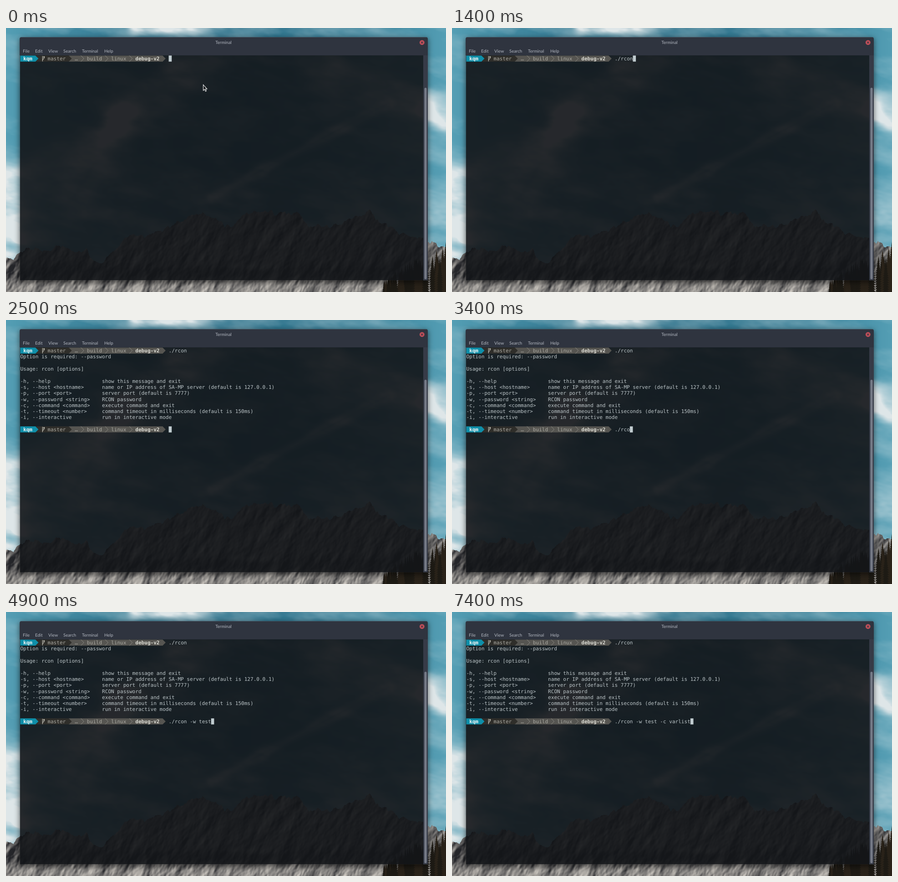
An HTML page with a canvas for the animation above (8 s loop, 967x579 px).

```html
<!DOCTYPE html>
<html lang="en">
<head>
<meta charset="utf-8">
<title>Terminal</title>
<style>
  html, body { margin: 0; width: 100%; height: 100%; overflow: hidden; background: #3f8ba2; }
  canvas, svg { position: absolute; left: 0; top: 0; width: 967px; height: 579px; }
  .shadow {
    position: absolute; left: 30px; top: 20px; width: 897px; height: 534px;
    border-radius: 4px 4px 0 0; box-shadow: 0 3px 12px 1px rgba(0, 0, 0, .5);
  }
  text { white-space: pre; text-rendering: geometricPrecision; }
  .ui { font: 9.5px Lato, "Open Sans", sans-serif; fill: #b4b9c2; }
  .mono { font: 11.06px "DejaVu Sans Mono", monospace; fill: #bcc5c8; }
  .bold { font-weight: bold; }
</style>
</head>
<body>
<canvas id="scene" width="967" height="579"></canvas>
<div class="shadow"></div>
<svg id="stage" viewBox="0 0 967 579">
  <rect x="30.5" y="60" width="887" height="493.5" fill="#121418" fill-opacity=".9"/>
  <path d="M30 60V24a4 4 0 0 1 4-4H923a4 4 0 0 1 4 4V60Z" fill="#2f343f"/>
  <path d="M33 20.5H924" stroke="#3d434f"/>
  <rect x="917" y="60" width="10" height="493.5" fill="#363b47"/>
  <rect x="919.5" y="131" width="5" height="420" rx="2.5" fill="#767b87"/>
  <circle cx="914.3" cy="31.8" r="5.4" fill="#c04f5a"/>
  <path d="M912.3 29.8l4 4m0-4l-4 4" stroke="#2f343f" stroke-width="1.2"/>
  <text class="ui" x="478" y="35.2" text-anchor="middle">Terminal</text>
  <g id="menu"></g>
  <g id="screen"></g>
  <path id="arrow" d="M433.5 124.5v12.6l2.9-2.6 2 4.4 1.9-.9-1.9-4.2h3.4Z"
        fill="#15191c" stroke="#f2f2f2" stroke-width="1.1"/>
  <g id="beam" fill="none">
    <path d="M430 116q3 0 3 2v12q0 2-3 2M436 116q-3 0-3 2v12q0 2 3 2" stroke="#f2f2f2" stroke-width="2.4"/>
    <path d="M430 116q3 0 3 2v12q0 2-3 2M436 116q-3 0-3 2v12q0 2 3 2" stroke="#15191c" stroke-width=".9"/>
  </g>
</svg>
<script>
const W = 967, H = 579, LOOP = 8000;
const byId = id => document.getElementById(id);

// ---------- wallpaper ----------
const ctx = byId('scene').getContext('2d');
const clamp = v => Math.max(0, Math.min(1, v));
const lerp = (a, b, k) => a + (b - a) * k;
const mix = (a, b, k) => a.map((v, i) => lerp(v, b[i], k));
const ease = k => k * k * (3 - 2 * k);
const bell = d => Math.exp(-d * d);

function hash(x, y) {
  let h = Math.imul(x, 374761393) + Math.imul(y, 668265263);
  h = Math.imul(h ^ h >>> 13, 1274126177);
  return ((h ^ h >>> 16) >>> 0) / 4294967296;
}

function noise(x, y) {
  const ix = Math.floor(x), iy = Math.floor(y), kx = ease(x - ix), ky = ease(y - iy);
  return lerp(
    lerp(hash(ix, iy), hash(ix + 1, iy), kx),
    lerp(hash(ix, iy + 1), hash(ix + 1, iy + 1), kx), ky);
}

function fractal(x, y, octaves) {
  let sum = 0, total = 0;
  for (let o = 0, size = 1; o < octaves; o++, size /= 2) {
    sum += size * noise(x / size, y / size);
    total += size;
  }
  return sum / total;
}

// cloud bands: from, to, width, strength
const bands = [
  [430, 50, 260, 180, 42, .55],
  [260, 180, 150, 370, 34, .5],
  [230, 215, 0, 340, 30, .5],
  [840, 165, 450, 370, 10, .4],
  [650, 70, 960, 190, 34, .5],
  [-5, 330, 10, 470, 42, .8],
  [290, -4, 470, -4, 16, .7],
  [925, 185, 980, 225, 17, .8]
];

function distance(x, y, [x0, y0, x1, y1]) {
  const dx = x1 - x0, dy = y1 - y0;
  const k = clamp(((x - x0) * dx + (y - y0) * dy) / (dx * dx + dy * dy));
  return Math.hypot(x - x0 - k * dx, y - y0 - k * dy);
}

function skyColor(x, y) {
  const wisp = fractal((x + y) / 90, (y - x * .3) / 34, 4);
  const bend = (fractal(x / 80, y / 80, 2) - .5) * 1.6;
  let cover = .3 * clamp((wisp - .35) * 2) + .28 * wisp * clamp((y - 290) / 120);
  for (const band of bands)
    cover += band[5] * bell(distance(x, y, band) / band[4] + bend) * (.4 + wisp);
  const edge = (2 * x / W - 1) ** 2;
  return mix(mix([46, 115, 140], [84, 158, 180], edge), [222, 230, 232], clamp(cover));
}

const ridge = [[0, 502], [128, 476], [215, 510], [262, 466], [345, 441], [405, 414], [443, 411], [490, 432],
  [537, 408], [612, 397], [690, 440], [745, 430], [793, 405], [830, 430], [967, 485]];

function ridgeY(x) {
  const i = Math.max(1, ridge.findIndex(p => p[0] >= x));
  const [x0, y0] = ridge[i - 1], [x1, y1] = ridge[i];
  return lerp(y0, y1, (x - x0) / (x1 - x0)) + (fractal(x / 16, 7, 4) - .5) * 30;
}

const relief = (x, y) => fractal((x + y * .4) / 24, y / 42, 4);

function rockColor(x, y) {
  const slope = relief(x - 1.5, y - 1) - relief(x + 1.5, y + 1);
  const foot = bell((y - 535) / 18), floor = clamp((y - 545) / 20);
  const scree = bell((x - 550) / 60) * bell((y - 523) / 8);
  const tone = .4 + slope * 2.4 - .2 * foot + .18 * floor + .25 * scree;
  return mix([36, 37, 41], [214, 209, 201], clamp(tone));
}

function drawLandscape() {
  const image = ctx.createImageData(W, H);
  for (let x = 0; x < W; x++) {
    const top = ridgeY(x);
    for (let y = 0; y < H; y++) {
      const rgb = y < top ? skyColor(x, y) : rockColor(x, y);
      image.data.set([...rgb, 255], (y * W + x) * 4);
    }
  }
  ctx.putImageData(image, 0, 0);
}

function drawTrees() {
  for (let i = 0; i < 75; i++) {
    const x = 828 + 142 * hash(i, 1);
    const rise = ((x - 828) / 142) ** .8;
    const top = H - 18 - 96 * rise * (.5 + .5 * hash(i, 2));
    ctx.fillStyle = hash(i, 3) < .6 ? '#1d1a14' : '#292219';
    ctx.beginPath();
    for (let y = top, half = 1.2; y < H; y += 5, half = Math.min(7, half + .8)) {
      ctx.moveTo(x, y - 2);
      ctx.lineTo(x - half, y + 7);
      ctx.lineTo(x + half, y + 7);
    }
    ctx.fill();
  }
}

drawLandscape();
drawTrees();

// ---------- terminal ----------
const CELL = 6.656, LINE = 13.3, LEFT = 31.4, TOP = 60.4;

function el(parent, tag, attrs, text = '') {
  const node = document.createElementNS('http://www.w3.org/2000/svg', tag);
  for (const key in attrs) node.setAttribute(key, attrs[key]);
  node.textContent = text;
  parent.append(node);
  return node;
}
const colX = col => LEFT + col * CELL;
const rowY = row => TOP + row * LINE;
const write = (parent, row, col, text, style = {}) =>
  el(parent, 'text', { class: 'mono', x: colX(col), y: rowY(row) + 10.7, ...style }, text);

const screen = byId('screen');
const group = () => el(screen, 'g', {});

for (const [x, label] of [[37, 'File'], [64, 'Edit'], [93, 'View'], [126, 'Search'], [167, 'Terminal'], [216, 'Help']])
  el(byId('menu'), 'text', { class: 'ui', x, y: 54.3 }, label);

function drawPrompt(row) {
  const g = group(), y = rowY(row), mid = y + LINE / 2, end = y + LINE;
  const segment = (from, to, fill) => el(g, 'path', {
    d: `M${colX(from)} ${y}H${colX(to)}L${colX(to + 1)} ${mid}L${colX(to)} ${end}H${colX(from)}Z`, fill
  });
  segment(16, 47, '#565551');
  segment(5, 16, '#2f2e2a');
  segment(0, 5, '#0f8fa9');
  for (const col of [20, 28, 36])
    el(g, 'path', {
      d: `M${colX(col)} ${y}L${colX(col + 1)} ${mid}L${colX(col)} ${end}`,
      fill: 'none', stroke: '#93928c', 'stroke-width': .9
    });
  el(g, 'path', {
    d: `M80.3 ${y + 1}V${end - .5}M80.3 ${y + 9.5}L83.6 ${y + 6.2}V${y + 2.5}M82 ${y + 4}l1.6 -2 1.6 2`,
    fill: 'none', stroke: '#c6c5bb', 'stroke-width': 1.2
  });
  write(g, row, 1, 'kqm', { class: 'mono bold', style: 'fill:#f1f4f4' });
  const grey = { style: 'fill:#aaa9a2' };
  write(g, row, 9, 'master', grey);
  write(g, row, 18, '…', grey);
  write(g, row, 22, 'build', grey);
  write(g, row, 30, 'linux', grey);
  write(g, row, 38, 'debug-v2', { class: 'mono bold', style: 'fill:#dcdcd4' });
  return g;
}

drawPrompt(0);
const output = group();
write(output, 1, 0, 'Option is required: --password');
write(output, 3, 0, 'Usage: rcon [options]');
[
  ['-h, --help', 'show this message and exit'],
  ['-s, --host <hostname>', 'name or IP address of SA-MP server (default is 127.0.0.1)'],
  ['-p, --port <port>', 'server port (default is 7777)'],
  ['-w, --password <string>', 'RCON password'],
  ['-c, --command <command>', 'execute command and exit'],
  ['-t, --timeout <number>', 'command timeout in milliseconds (default is 150ms)'],
  ['-i, --interactive', 'run in interactive mode']
].forEach(([flag, help], i) => {
  write(output, 5 + i, 0, flag);
  write(output, 5 + i, 27, help);
});
const prompt2 = drawPrompt(13);
const caret = el(screen, 'rect', { width: CELL, height: LINE, fill: '#c1ccd0' });

// each burst spreads its keys evenly: text, first key, last key
const commands = [
  { row: 0, bursts: [['./', 600, 700], ['r', 900, 900], ['co', 1100, 1200], ['n', 1400, 1400]] },
  { row: 13, bursts: [['./r', 2600, 2700], ['co', 3400, 3400], ['n -', 3600, 4000], ['w ', 4200, 4300],
    ['test', 4600, 4900], [' ', 5300, 5300], ['-c ', 6300, 6700], ['varlist', 7000, 7400]] }
];
for (const c of commands) c.node = write(screen, c.row, 49, '');

const typed = (bursts, t) => bursts.map(([text, first, last]) =>
  [...text].filter((_, i) => t >= lerp(first, last, i / Math.max(1, text.length - 1))).join('')
).join('');

const RUN = 1600, READY = 1700, TICK = 100;
const within = (t, from, to) => t >= from && t < to;
const show = (node, on) => node.setAttribute('visibility', on ? 'visible' : 'hidden');

function render(time) {
  const t = Math.floor(time / TICK) * TICK;
  const [first, second] = commands.map(c => c.node.textContent = typed(c.bursts, t));
  show(output, t >= RUN);
  show(prompt2, t >= READY);
  show(byId('arrow'), t < 300);
  show(byId('beam'), within(t, 300, 600));

  const col = t < RUN ? 49 + first.length : t < READY ? 0 : 49 + second.length;
  caret.setAttribute('x', colX(col));
  caret.setAttribute('y', rowY(t < RUN ? 0 : 13));
  show(caret, !within(t, 400, 600) && !within(t, 2100, 2500));
}

function tick() {
  render(performance.now() % LOOP);
  requestAnimationFrame(tick);
}
tick();
</script>
</body>
</html>
```
